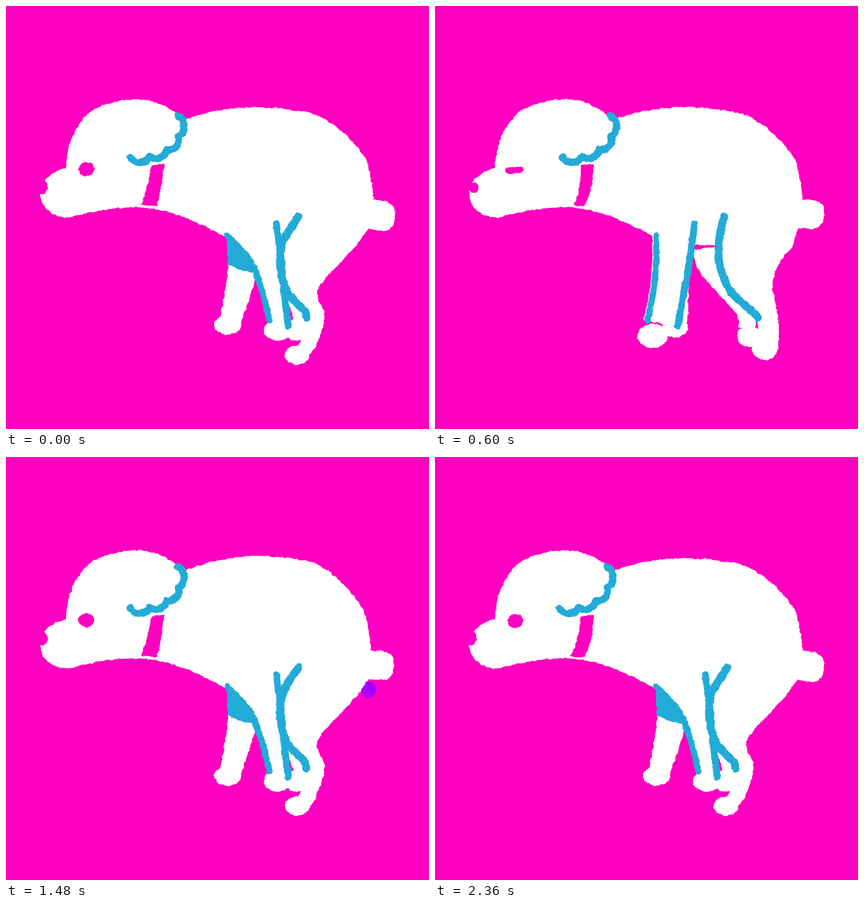
These frames come from a looping animation (748x748 px, 2400 ms). An HTML page:

```html
<!DOCTYPE html>
<html lang="en">
<head>
<meta charset="utf-8">
<title>Dog</title>
<style>
  html, body { margin: 0; width: 100%; height: 100%; overflow: hidden; background: #ff00c0; }
  svg { display: block; width: 100vw; height: 100vh; }
  .fur { fill: #fff; }
  .hole { fill: #ff00c0; }
  .ink, .lid { fill: none; stroke: #23abd7; stroke-linecap: round; stroke-linejoin: round; stroke-width: 13; }
  .lid { stroke: #ff00c0; stroke-width: 10; }
  .patch { fill: #23abd7; }
  .drop { fill: #a800ff; }
</style>
</head>
<body>
<svg viewBox="0 0 748 748">
  <filter id="rough" filterUnits="userSpaceOnUse" x="0" y="0" width="748" height="748" color-interpolation-filters="sRGB">
    <feTurbulence id="noise" type="fractalNoise" baseFrequency=".12" numOctaves="2" seed="1"/>
    <feColorMatrix values="1 0 0 0 0  0 1 0 0 0  0 0 0 0 0  0 0 0 0 1" result="n"/>
    <feDisplacementMap in="SourceGraphic" in2="n" scale="4.5" xChannelSelector="R" yChannelSelector="G"/>
  </filter>
  <rect width="748" height="748" class="hole"/>
  <g id="dog" filter="url(#rough)"></g>
</svg>
<script>
const LOOP = 2400, STEP = 40;
const dog = document.getElementById('dog');
const noise = document.getElementById('noise');

function add(tag, cls) {
  const el = document.createElementNS('http://www.w3.org/2000/svg', tag);
  el.setAttribute('class', cls);
  return dog.appendChild(el);
}
function set(el, attrs) {
  for (const k in attrs) el.setAttribute(k, attrs[k]);
}

const mix = (a, b, u) => a + (b - a) * u;
const clamp = v => Math.max(0, Math.min(1, v));
const ease = u => mix(u, u * u * (3 - 2 * u), .6);

// Smooth open line through points
function curve(pts) {
  const at = i => pts[Math.max(0, Math.min(pts.length - 1, i))];
  let d = pts[0].join(' ');
  for (let i = 0; i < pts.length - 1; i++) {
    const [a, b, c, e] = [at(i - 1), at(i), at(i + 1), at(i + 2)];
    const p = b.map((v, j) => v + (c[j] - a[j]) / 6);
    const q = c.map((v, j) => v - (e[j] - b[j]) / 6);
    d += `C${[...p, ...q, ...c].map(v => v.toFixed(1)).join(' ')}`;
  }
  return d;
}
const line = pts => 'M' + curve(pts);
const shape = (front, back) => `M${curve(front)}L${curve(back)}Z`;

// Every leg follows one number: how far its foot has swung
const squat   = { farFront: 0,  nearFront: 1,   farHind: .35, nearHind: 0 };
const shuffle = { farFront: .5, nearFront: 1,   farHind: .2,  nearHind: 0 };
const stand   = { farFront: 1,  nearFront: 0,   farHind: 1,   nearHind: 1 };
const crouch  = { farFront: .5, nearFront: .45, farHind: 0,   nearHind: .5 };

const legs = {
  farFront(a) {
    const q = a * a;
    return {
      front: [[392, 400], [392 + 14 * q, 470], [380 + 32 * a, 547], [380 + 32 * a, 564]],
      back: [[410 + 32 * a, 570], [417 + 30 * a, 556], [439 + 10 * q, 488], [456, 425]],
      foot: [392 + 32 * a, 564 + 5 * a, 24, 17]
    };
  },
  nearFront(s) {
    const k = Math.sin(Math.PI / 2 * s);
    return {
      front: [[391, 406], [391 + 41 * k, 451], [386 + 67 * s, 505], [376 + 90 * s, 556]],
      back: [[429 + 70 * s, 566], [440 + 52 * s, 508], [450 + 37 * k, 452], [459 + 19 * k, 385]],
      foot: [385 + 95 * s, 583 - 10 * s * s, 27 - 3 * s, 21 - 2 * s],
      rim: 7 * (1 - k)
    };
  },
  farHind(c) {
    const q = c * c, x = 491 + 42 * c;
    return {
      front: [[478 - 23 * c, 432], [484 - 12 * c, 475], [x, 545], [x + 4, 568]],
      back: [[x + 32, 570], [x + 34, 540], [540, 420]],
      foot: [507 + 49 * q, 571 + 13 * q, 22, 19]
    };
  },
  nearHind(d) {
    const q = d * d;
    return {
      front: [[517 - 6 * d, 372], [490 + 12 * d, 417], [485 + 19 * d, 460], [497 + 26 * d, 505], [527 + 32 * q, 538], [531 + 40 * q, 551]],
      back: [[520 + 52 * q, 596], [512 + 62 * q, 612], [538 + 64 * q, 616], [556 + 52 * q, 580], [563 + 43 * d, 545],
        [551 + 46 * d, 502 - 12 * d], [596 + 16 * d, 449], [618 + 14 * q, 425], [641, 393]],
      foot: [515 + 68 * q, 617 - 11 * q, 22, 17 + 3 * q]
    };
  }
};

const keys = [
  { t: 0, pose: squat, arch: 0, droop: 1 },
  { t: 280, pose: shuffle, arch: 0, droop: 0 },
  { t: 600, pose: stand, arch: 0, droop: 0 },
  { t: 1160, pose: crouch, arch: 0, droop: .4 },
  { t: 1480, pose: squat, arch: .7, droop: 0 },
  { t: 1960, pose: squat, arch: 1, droop: 0 },
  { t: 2200, pose: squat, arch: 0, droop: 1 },
  { t: LOOP, pose: squat, arch: 0, droop: 1 }
];

const drop = add('ellipse', 'drop');
const body = add('path', 'fur');
const limbs = Object.keys(legs).map(name => ({ name, skin: add('path', 'fur'), foot: add('ellipse', 'fur') }));
const patch = add('path', 'patch');
const inks = ['11px', '12px', '14px'].map(w => {
  const el = add('path', 'ink');
  el.style.strokeWidth = w;
  return el;
});
const collar = add('path', 'hole');
const ear = add('path', 'ink');
const nose = add('ellipse', 'hole');
const eye = add('ellipse', 'hole');
const lid = add('path', 'lid');

function drawBody(arch, droop) {
  const h = 6 * arch, w = 4 * droop;
  set(body, { d: `M61 335C60 318 64 309 80 298Q92 290 106 286
    C108 235 130 200 155 183C172 174 200 165 230 165C265 165 292 180 314 201
    C355 187 400 ${179 - h} 440 ${179 - h}C475 ${179 - h} 515 ${184 - h} 545 ${191 - h}
    C583 206 ${625 - h} 247 ${638 - h} 275C${644 - h} 295 ${649 - h} 325 ${650 - h} 343
    C672 ${341 + w / 2} ${688 - h / 2} 346 ${688 - h / 2} ${364 + w}
    C${688 - h / 2} ${386 + w} 680 ${394 + w} 666 ${394 + w}Q652 394 640 393
    L600 425L455 422L387 408C350 388 300 360 235 356C190 356 160 361 118 373C95 377 63 365 61 335Z` });
}

function drawLegs(pose) {
  const leg = {};
  for (const { name, skin, foot } of limbs) {
    const { front, back, foot: [cx, cy, rx, ry], rim = 0 } = leg[name] = legs[name](pose[name]);
    set(skin, { d: shape(front.map(([x, y]) => [x - rim, y]), back) });
    set(foot, { cx, cy, rx, ry });
  }
  const { nearFront: near, nearHind: hind } = leg;
  [near.front, near.back, hind.front].forEach((pts, i) => set(inks[i], { d: line(pts) }));
  const x = near.front[1][0];
  set(patch, { d: `M390 406L392 457L${mix(392, x, .5)} 466L${x + 4} 471L${x} 451Z` });
}

function drawFace(shut, second) {
  const shift = shut && second ? 6 : 0;
  const round = shut && !second ? .75 : .58;
  const cusps = [[304, 194], [305, 231], [284, 254], [254, 266], [220, 268]].map(([x, y]) => [x + shift, y]);
  const bumps = cusps.slice(1).map(([x, y], i) => {
    const r = round * Math.hypot(x - cusps[i][0], y - cusps[i][1]);
    return `A${r} ${r} 0 0 1 ${x} ${y}`;
  });
  set(ear, { d: `M${cusps[0]}` + bumps.join('') });

  const bow = second ? 6 : 0, in_ = shut ? 7 : 0;
  set(collar, { d: `M258 282L280 279Q${275 + bow} 325 ${267 - bow / 2} 353
    Q252 ${354 + bow / 2} ${239 + in_} 351Q${249 + bow + in_ / 2} 325 258 282` });
  set(nose, shut ? { cx: 68, cy: 321, rx: 9, ry: 9.5 } : { cx: 64, cy: 321, rx: 10, ry: 12 });
  set(eye, { cx: 142, cy: second ? 290 : 288.5, rx: shut ? 0 : 14, ry: 12.5 });
  set(lid, { d: shut ? `M129 291Q140 ${second ? 292 : 297} 152 ${second ? 289 : 292}` : '' });
}

function drawDrop(t) {
  const grow = clamp((t - 1400) / 80), sink = clamp((t - 1480) / 220);
  const fall = Math.max(0, t - 1700), gone = clamp((t - 2000) / 120);
  set(drop, {
    cx: mix(641, 654, sink),
    cy: Math.min(612, mix(411, 430, sink) + .0021 * fall * fall) + 16 * gone,
    rx: 13.5 * grow,
    ry: mix(15, 22, sink) * grow * (1 - gone)
  });
}

function draw(frame) {
  const t = frame * STEP;
  const i = keys.findIndex(k => k.t > t);
  const from = keys[i - 1], to = keys[i];
  const u = ease((t - from.t) / (to.t - from.t));
  const pose = {};
  for (const name in legs) pose[name] = mix(from.pose[name], to.pose[name], u);

  drawBody(mix(from.arch, to.arch, u), mix(from.droop, to.droop, u));
  drawLegs(pose);
  drawFace(t >= 400 && t < 1360, frame % 4 > 1);
  drawDrop(t);
  set(noise, { seed: 1 + ((frame + 1) >> 1) % 3 });
}

let last = -1;
function tick() {
  const frame = Math.floor(performance.now() % LOOP / STEP);
  if (frame !== last) draw(last = frame);
  requestAnimationFrame(tick);
}
tick();
</script>
</body>
</html>
```
